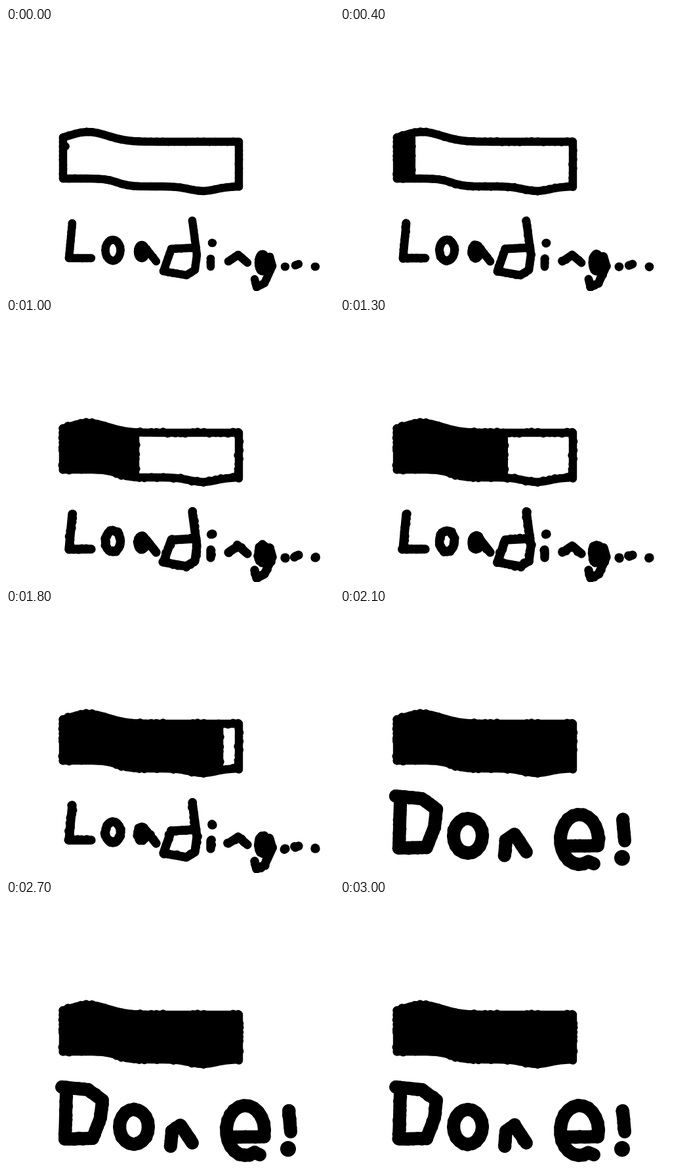
Animation of 500x400 px, one loop 3.1 s. Source, as an HTML page with a canvas:

```html
<!DOCTYPE html>
<html lang="en">
<head>
<meta charset="utf-8">
<title>Loading</title>
<style>
  html, body { margin: 0; width: 100%; height: 100%; overflow: hidden; background: #fff; }
  canvas { display: block; }
</style>
</head>
<body>
<canvas id="stage" width="500" height="400"></canvas>
<script>
const ctx = document.getElementById('stage').getContext('2d');
const LOOP = 3100, STEP = 100, DONE_AT = 2100, FILL_TIME = 2270;
const LEFT = 87, RIGHT = 355;

const line = text => text.split(' ').map(pair => pair.split(',').map(Number));

function arc(cx, cy, rx, ry, from = 0, to = Math.PI * 2) {
  const steps = 20;
  return Array.from({ length: steps + 1 }, (_, i) => {
    const angle = from + (to - from) * i / steps;
    return [cx + rx * Math.cos(angle), cy + ry * Math.sin(angle)];
  });
}

const hump = (x, center, spread) => Math.exp(-(((x - center) / spread) ** 2));
const barTop = x => 173 - 15 * hump(x, 125, 42);
const barBottom = x => 229 + 12 / (1 + Math.exp((170 - x) / 9)) + 7 * hump(x, 300, 28);

// Closed outline of the bar from its left side to the given right side
function barShape(right) {
  const top = [], bottom = [];
  for (let i = 0; i <= 30; i++) {
    const x = LEFT + (right - LEFT) * i / 30;
    top.push([x, barTop(x)]);
    bottom.unshift([x, barBottom(x)]);
  }
  return [...top, ...bottom, top[0]];
}

const loading = [
  line('101,297 96,350 130,350'),                                   // L
  arc(163, 338, 11.5, 16),                                          // o
  arc(207, 340, 6, 10), line('214,336 229,355'),                    // a
  line('284,293 291,345 288,368 275,376 240,370 252,336 290,334'),  // d
  line('314,327 315,327'), line('312,351 312,363'),                 // i
  line('339,355 354,345 368,357'),                                  // n
  arc(391, 357, 6, 13),                                             // g
  line('402,348 406,362 394,388 382,394 379,382'),
  line('425,363 426,363'), line('441,361 446,359'), line('471,363 472,363')
];

const done = [
  line('85,283 125,287 147,303 144,330 132,361 90,362 92,290'),     // D
  arc(195, 343.5, 22, 26.5),                                        // o
  line('251,373 253,350 266,341 284,368'),                          // n
  [...line('345,359'), ...arc(365, 349, 29, 38, 0.25, -5.2), ...line('387,386')], // e
  line('431,319 434,351')                                           // !
];

function randomizer(seed) {
  let state = seed * 7919 + 17;
  return () => {
    state = (state * 16807) % 2147483647;
    return state / 2147483647 - 0.5;
  };
}

function trace(path) {
  ctx.beginPath();
  path.forEach(([x, y]) => ctx.lineTo(x, y));
}

function dot(x, y, radius) {
  ctx.beginPath();
  ctx.arc(x, y, radius, 0, Math.PI * 2);
  ctx.fill();
}

// A round pen line with small irregular dabs along it
function brush(path, width, rough, random) {
  trace(path);
  ctx.lineWidth = width;
  ctx.stroke();
  for (let i = 1; i < path.length; i++) {
    const [ax, ay] = path[i - 1], [bx, by] = path[i];
    const count = Math.max(1, Math.round(Math.hypot(bx - ax, by - ay) / 7));
    for (let k = 0; k < count; k++) {
      const p = k / count;
      dot(ax + (bx - ax) * p + random() * rough,
          ay + (by - ay) * p + random() * rough, width / 2);
    }
  }
}

function fillEdge(time) {
  const p = Math.min(1, time / FILL_TIME);
  return LEFT + (RIGHT - LEFT) * p * p * (3 - 2 * p);
}

function drawBar(time, rough) {
  const random = randomizer(5);
  const edge = fillEdge(time);
  brush(barShape(RIGHT), 12.4, rough, random);
  dot(91, 180, 6);
  if (time > 0) {
    trace(barShape(edge));
    ctx.fill();
    brush([[edge, barTop(edge)], [edge, barBottom(edge)]], 12, rough, random);
  }
}

function draw(time) {
  const age = Math.min(1, time / 1000);
  const rough = 0.5 + 2.5 * age;
  const random = randomizer(time / STEP + 1);
  ctx.fillStyle = '#fff';
  ctx.fillRect(0, 0, 500, 400);
  ctx.fillStyle = ctx.strokeStyle = '#000';
  ctx.lineCap = ctx.lineJoin = 'round';
  drawBar(time, rough);
  if (time < DONE_AT) {
    loading.forEach(path => brush(path, 12.4 + age, rough, random));
  } else {
    done.forEach(path => brush(path, 20, 1.6, random));
    dot(430, 377, 12);
  }
}

function tick() {
  draw(Math.floor(performance.now() % LOOP / STEP) * STEP);
  requestAnimationFrame(tick);
}
tick();
</script>
</body>
</html>
```
